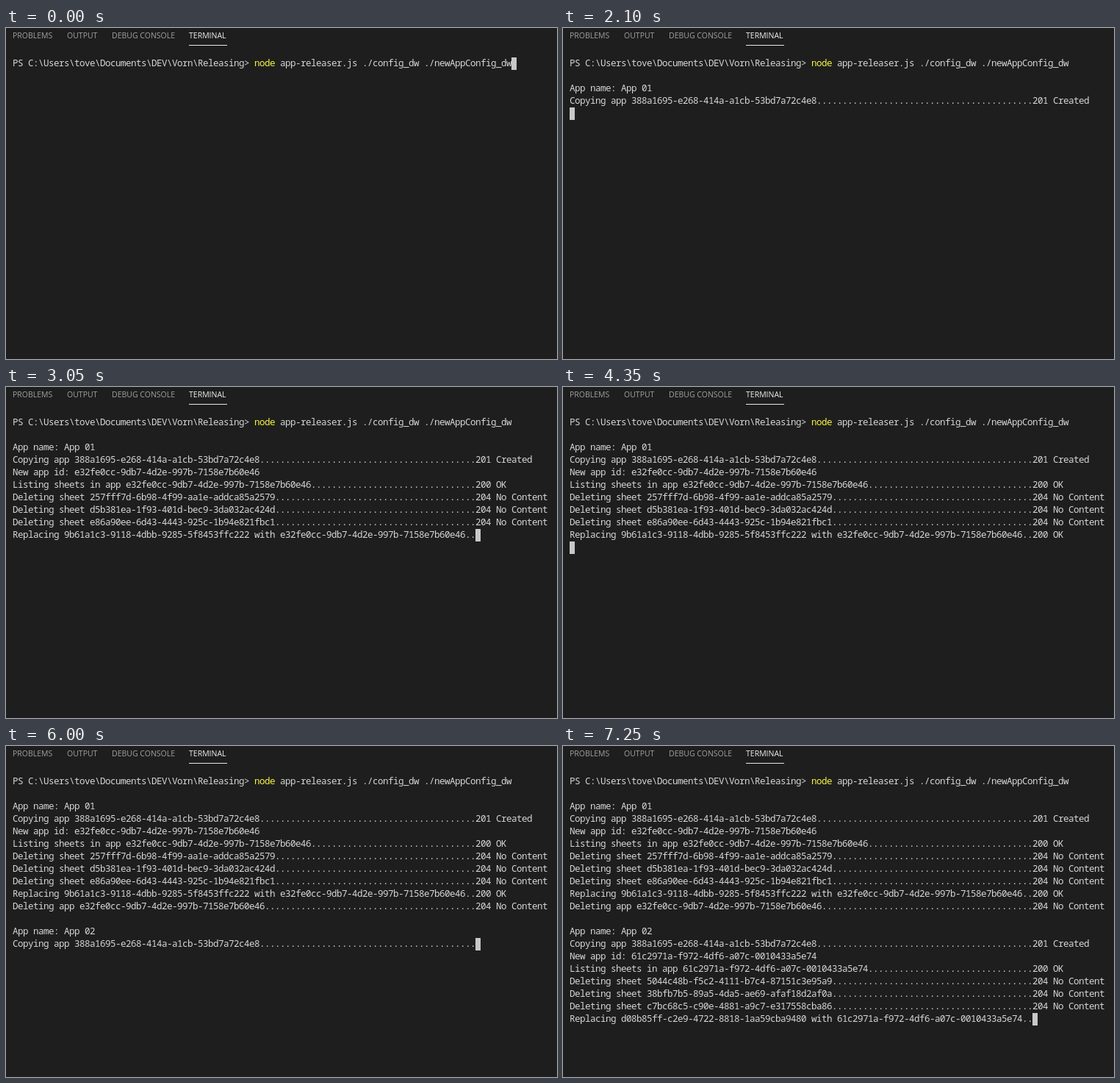
These frames come from a looping animation (750x450 px, 8000 ms). An HTML page with a canvas:

```html
<!DOCTYPE html>
<html lang="en">
<head>
<meta charset="utf-8">
<title>Terminal run</title>
<style>
  html, body { margin: 0; width: 100%; height: 100%; overflow: hidden; background: #1e1e1e; }
  canvas { display: block; width: 750px; height: 450px; }
</style>
</head>
<body>
<canvas id="stage" width="750" height="450"></canvas>
<script>
const ctx = document.getElementById('stage').getContext('2d');
const LOOP = 8000;
const LEFT = 9, TOP = 40, CELL = 7, ROW = 17, STATUS_COL = 90;
// Glyphs are a little wider than their cells, so the text sits tight
const MONO = '500 12.6px "Noto Sans Mono", "DejaVu Sans Mono", monospace';
const SANS = '10.5px "Open Sans", "Noto Sans", sans-serif';
const TEXT = '#d6d6d6', YELLOW = '#f5f543';

const TABS = [['PROBLEMS', 9], ['OUTPUT', 83], ['DEBUG CONSOLE', 144], ['TERMINAL', 249]];
const PROMPT = 'PS C:\\Users\\tove\\Documents\\DEV\\Vorn\\Releasing> ';
const COMMAND = 'node';
const ARGS = ' app-releaser.js ./config_dw ./newAppConfig_dw';

const TEMPLATE = '388a1695-e268-414a-a1cb-53bd7a72c4e8';
const APP1 = 'e32fe0cc-9db7-4d2e-997b-7158e7b60e46';
const APP2 = '61c2971a-f972-4df6-a07c-0010433a5e74';
const dots = text => text.padEnd(STATUS_COL, '.');
const sheet = id => dots('Deleting sheet ' + id);
const replacing = (old, app) => dots('Replacing ' + old + ' with ' + app);
const OK = '200 OK\n', CREATED = '201 Created\n', GONE = '204 No Content\n';

// Each entry: time in ms, text the program prints at that time
const OUTPUT = [
  [350, '\n'],
  [500, '\nApp name: App 01\n' + dots('Copying app ' + TEMPLATE)],
  [2100, CREATED],
  [2150, 'New app id: ' + APP1 + '\n' + dots('Listing sheets in app ' + APP1)],
  [2200, OK],
  [2250, sheet('257fff7d-6b98-4f99-aa1e-addca85a2579')],
  [2300, GONE],
  [2350, sheet('d5b381ea-1f93-401d-bec9-3da032ac424d')],
  [2400, GONE],
  [2450, sheet('e86a90ee-6d43-4443-925c-1b94e821fbc1')],
  [2500, GONE],
  [2550, replacing('9b61a1c3-9118-4dbb-9285-5f8453ffc222', APP1)],
  [4350, OK],
  [4400, dots('Deleting app ' + APP1)],
  [4850, GONE],
  [4900, '\nApp name: App 02\n' + dots('Copying app ' + TEMPLATE)],
  [6700, CREATED],
  [6750, 'New app id: ' + APP2 + '\n' + dots('Listing sheets in app ' + APP2)],
  [6800, OK],
  [6850, sheet('5044c48b-f5c2-4111-b7c4-87151c3e95a9')],
  [6900, GONE],
  [6950, sheet('38bfb7b5-89a5-4da5-ae69-afaf18d2af0a')],
  [7050, GONE],
  [7100, sheet('c7bc68c5-c90e-4881-a9c7-e317558cba86')],
  [7150, GONE],
  [7200, replacing('d08b85ff-c2e9-4722-8818-1aa59cba9480', APP2)]
];

function drawTabs() {
  ctx.font = SANS;
  for (const [name, x] of TABS) {
    ctx.fillStyle = name === 'TERMINAL' ? '#f0f0f0' : '#a0a0a0';
    ctx.fillText(name, x, 14);
  }
  ctx.fillStyle = '#e7e7e7';
  ctx.fillRect(249, 23, 52, 1);
}

// Writes text on the character grid and returns the next free cell
function write(text, col, row, color) {
  ctx.fillStyle = color;
  for (const ch of text) {
    if (ch === '\n') {
      col = 0;
      row++;
    } else {
      if (ch !== ' ') ctx.fillText(ch, LEFT + col * CELL, TOP + 12 + row * ROW);
      col++;
    }
  }
  return [col, row];
}

function draw(time) {
  ctx.fillStyle = '#1e1e1e';
  ctx.fillRect(0, 0, 750, 450);
  drawTabs();

  ctx.font = MONO;
  const printed = OUTPUT.filter(([at]) => time >= at).map(([, text]) => text).join('');
  let [col, row] = write(PROMPT, 0, 0, TEXT);
  [col, row] = write(COMMAND, col, row, YELLOW);
  [col, row] = write(ARGS + printed, col, row, TEXT);
  ctx.fillStyle = '#c8c8c8';
  ctx.fillRect(LEFT + col * CELL, TOP + row * ROW, CELL, ROW);
}

const start = performance.now();
function tick() {
  draw((performance.now() - start) % LOOP);
  requestAnimationFrame(tick);
}
tick();
</script>
</body>
</html>
```
